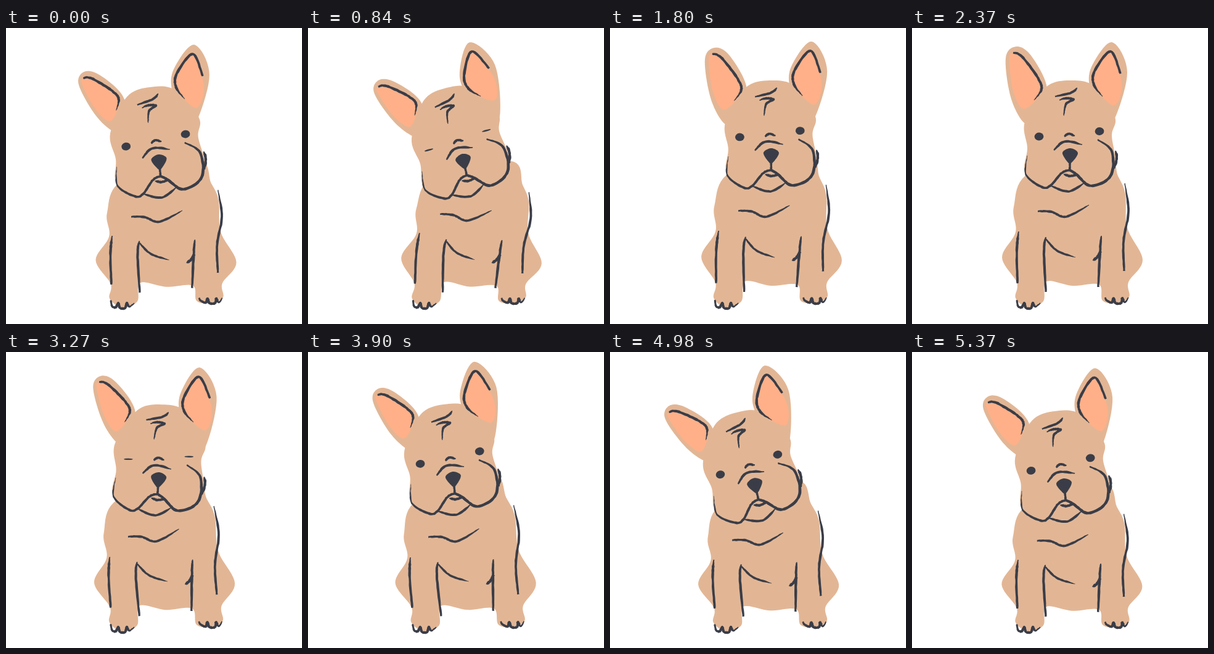
Animation of 480x480 px, one loop 5.4 s. Source, as an HTML page with a canvas:

```html
<!DOCTYPE html>
<html lang="en">
<head>
<meta charset="utf-8">
<title>Dog tilting its head</title>
<style>
  html, body { margin: 0; width: 100%; height: 100%; overflow: hidden; background: #fff; }
  canvas { display: block; width: 480px; height: 480px; }
</style>
</head>
<body>
<canvas id="stage" width="480" height="480"></canvas>
<script>
const ctx = document.getElementById('stage').getContext('2d');
const LOOP = 5400, STEP = 30;
const FUR = '#e2b695', PINK = '#ffb088', INK = '#3a3d47';
const RAD = Math.PI / 180;

// time, nose x, nose y, head turn, left ear fold, right ear turn, lean, squash
const KEYS = [
  [0, 248, 217, -6.8, 1, 7, -1, 8.5],
  [570, 254, 219, -9, 1, -1, 7, 9],
  [840, 252, 216, -13.8, .95, -7.7, 10, 6.5],
  [1150, 244, 209, -19, .95, -7, 9.5, 2],
  [1480, 249, 206, -10, .5, -5, 7, 0],
  [1800, 261, 207, -1.1, 0, 1, 4, 0],
  [2370, 256, 207, 0, 0, 0, 0, 0],
  [2850, 250.5, 207, 1.5, .35, -2, -3, .5],
  [3270, 247, 207, 2.6, .75, -6, -6, 1],
  [3990, 234, 206, -8.5, .95, -7, -9, 1],
  [4500, 228, 211, -16.5, .95, -6.7, -10, 3],
  [5130, 238.5, 217, -13, 1, -1, -4, 7.5],
  [5370, 246.5, 217, -7.1, 1, 3.7, -1.2, 8.5]
];
const BLINKS = [840, 3270];

function key(i) {
  const n = KEYS.length, turn = Math.floor(i / n);
  const k = KEYS[i - turn * n];
  return { t: k[0] + turn * LOOP, v: k };
}

// Monotone cubic through the looping keys
function poseAt(t) {
  let i = KEYS.length - 1;
  while (KEYS[i][0] > t) i--;
  const [a, b, c, d] = [-1, 0, 1, 2].map(n => key(i + n));
  const span = c.t - b.t, u = (t - b.t) / span;
  const slope = (p, q, n) => (q.v[n] - p.v[n]) / (q.t - p.t);
  const blend = (m, n) => m * n <= 0 ? 0 : 2 * m * n / (m + n);
  const pose = [];
  for (let n = 1; n < 8; n++) {
    const s = slope(b, c, n);
    const m0 = blend(slope(a, b, n), s) * span;
    const m1 = blend(s, slope(c, d, n)) * span;
    const e = u * u * (3 - 2 * u);
    pose.push(b.v[n] + (c.v[n] - b.v[n]) * e
      + m0 * u * (1 - u) ** 2 - m1 * u * u * (1 - u));
  }
  return pose;
}

function eyeOpen(t) {
  const gap = Math.min(...BLINKS.map(b => Math.abs(t - b)));
  const u = Math.min(1, Math.max(0, (gap - 80) / 90));
  return u * u * (3 - 2 * u);
}

const rotate = (x, y, deg, s = 1) => {
  const c = Math.cos(deg * RAD) * s, n = Math.sin(deg * RAD) * s;
  return [x * c - y * n, x * n + y * c];
};

// Samples a Catmull-Rom curve given as x, y, x, y, ...
function curve(flat, map, closed) {
  const p = [];
  for (let i = 0; i < flat.length; i += 2) p.push([flat[i], flat[i + 1]]);
  const n = p.length, out = [], per = 10;
  const at = i => closed ? p[(i + n) % n] : p[Math.max(0, Math.min(n - 1, i))];
  for (let i = 0; i < (closed ? n : n - 1); i++) {
    const [a, b, c, d] = [at(i - 1), at(i), at(i + 1), at(i + 2)];
    for (let j = 0; j < per; j++) {
      const u = j / per;
      const f = k => b[k] + .5 * u * (c[k] - a[k] + u * (2 * a[k] - 5 * b[k] + 4 * c[k] - d[k]
        + u * (3 * (b[k] - c[k]) + d[k] - a[k])));
      out.push(map(f(0), f(1)));
    }
  }
  if (!closed) out.push(map(...p[n - 1]));
  return out;
}

function fill(points, color) {
  ctx.fillStyle = color;
  ctx.beginPath();
  points.forEach(p => ctx.lineTo(p[0], p[1]));
  ctx.closePath();
  ctx.fill();
}

const blob = (flat, map, color) => fill(curve(flat, map, true), color);

const grain = i => {
  const s = Math.sin(i * 12.9898) * 43758.5453;
  return s - Math.floor(s) - .5;
};

// Crayon line; a and b are the relative widths of its two ends
function line(flat, map, w = 4, a = .5, b = .5) {
  const p = curve(flat, map, false), last = p.length - 1;
  const left = [], right = [];
  p.forEach(([x, y], i) => {
    const q = p[Math.max(0, i - 1)], r = p[Math.min(last, i + 1)];
    const dx = r[0] - q[0], dy = r[1] - q[1], len = Math.hypot(dx, dy) || 1;
    const u = i / last;
    const h = w / 2 * Math.min(1, a + (1 - a) * u * 4, b + (1 - b) * (1 - u) * 4);
    const hl = h + grain(i + flat[0]) * .7, hr = h + grain(i + flat[1] + 50) * .7;
    left.push([x - dy / len * hl, y + dx / len * hl]);
    right.unshift([x + dy / len * hr, y - dx / len * hr]);
  });
  fill(left.concat(right), INK);
}

const BODY = [
  190, 235, 165, 290, 168, 331, 146, 372, 170, 413, 168, 438, 188, 453, 213, 443,
  218, 411, 260, 418, 303, 416, 309, 442, 332, 446, 352, 436, 351, 412, 374, 376,
  349, 324, 346, 270, 334, 240, 311, 200
];
const SKULL = [
  183, 152, 187, 195, 183, 230, 207, 258, 252, 265, 308, 253, 329, 220,
  324, 174, 329, 144, 298, 96, 260, 85, 217, 96
];
const EAR_L = [219, 98, 194, 46, 170, 30, 152, 48, 160, 112, 182, 154, 205, 150];
const PINK_L = [164, 41, 158, 52, 164, 102, 182, 131, 211, 98, 190, 57];
const EAR_R = [289, 100, 291, 63, 324, 23, 349, 72, 326, 152, 308, 140];
const PINK_R = [294, 88, 302, 54, 322, 39, 340, 90, 329, 125, 304, 107];
const NOSE = [244, 202, 257, 195, 269, 203, 258, 219, 252, 217];

function draw(t) {
  const [nx, ny, turn, fold, earTurn, lean, squash] = poseAt(t);

  // The feet stay put; the lean and squash grow with height
  const body = (x, y) => {
    const h = Math.max(0, 448 - y) / 148;
    return [x + lean * h, y + h * (squash + lean * .0045 * (x - 250))];
  };
  const head = (x, y) => {
    const [dx, dy] = rotate(x - 256, y - 207, turn);
    return [nx + dx, ny + dy];
  };
  const ear = (px, py, deg, s) => (x, y) => {
    const [dx, dy] = rotate(x - px, y - py, deg, s);
    return head(px + dx, py + dy);
  };
  const earL = ear(193, 118, -15 * fold, 1 - .11 * fold);
  const earR = ear(312, 115, earTurn, 1);

  ctx.fillStyle = '#fff';
  ctx.fillRect(0, 0, 480, 480);

  blob(BODY, body, FUR);
  blob(EAR_L, earL, FUR);
  blob(EAR_R, earR, FUR);
  blob(SKULL, head, FUR);
  blob(PINK_L, earL, PINK);
  blob(PINK_R, earR, PINK);

  // Chest and legs
  line([204, 297, 226, 298, 250, 306, 287, 287], body, 3.8, .7, .3);
  line([345, 252, 351, 298, 343, 345, 344, 394], body, 3.8, .3, .8);
  line([173, 330, 170, 360, 171, 414], body, 4, .4, .9);
  line([217, 339, 214, 362, 217, 428], body, 4, .4, .8);
  line([217, 342, 235, 361, 265, 372], body, 3.4, .7, .2);
  line([307, 337, 305, 362, 302, 420], body, 4, .3, .8);
  line([306, 362, 300, 372, 293, 377], body, 4.5, .9, .2);

  // Toes
  line([170, 441, 172, 451, 178, 453, 182, 446, 185, 454, 193, 454, 196, 446, 200, 452, 208, 446], body, 4.2, .6, .4);
  line([313, 437, 316, 442, 324, 445, 327, 438, 330, 446, 339, 446, 341, 438, 345, 445, 351, 437], body, 4.2, .6, .4);

  // Ears
  line([164, 40, 178, 46, 203, 79, 210, 99, 198, 117], earL, 4.2, .7, .2);
  line([338, 74, 322, 38, 296, 70, 295, 92, 309, 111], earR, 4.2, .8, .2);

  // Brow
  line([232, 111, 258, 105, 268, 97], head, 3.8, .6, .2);
  line([239, 117, 249, 114, 262, 116, 250, 123, 246, 142], head, 4, .3, .3);

  // Muzzle
  line([247, 176, 254, 171.5, 264, 175], head, 4, .6, .5);
  line([230, 198, 248, 184, 276, 189], head, 4, .5, .3);
  line([187, 207, 185, 238, 211, 258, 225, 255, 243, 235, 256, 231, 266, 236], head, 3.8, .2, .7);
  line([301, 181, 324, 200, 322, 240, 290, 256, 266, 237, 256, 231], head, 4.4, .5, .7);
  line([330, 199, 332, 211, 328, 228], head, 4.2, .3, .4);
  line([225, 256, 254, 265, 280, 251], head, 3.8, .5, .3);
  line([246, 237, 256, 240, 268, 238], head, 4.2, .3, .4);
  line([256, 216, 256, 232], head, 3.6, .9, .9);
  blob(NOSE, head, INK);

  // Eyes
  const ry = 1.3 + 5.1 * eyeOpen(t);
  for (const [x, y] of [[206, 176], [304, 167.5]]) {
    const [ex, ey] = head(x, y);
    ctx.beginPath();
    ctx.ellipse(ex, ey, 7.4, ry, (turn - 2) * RAD, 0, 7);
    ctx.fill();
  }
}

let start = null;
function frame(now) {
  if (start === null) start = now;
  const t = (now - start) % LOOP;
  draw(Math.floor(t / STEP) * STEP);
  requestAnimationFrame(frame);
}
draw(0);
requestAnimationFrame(frame);
</script>
</body>
</html>
```
